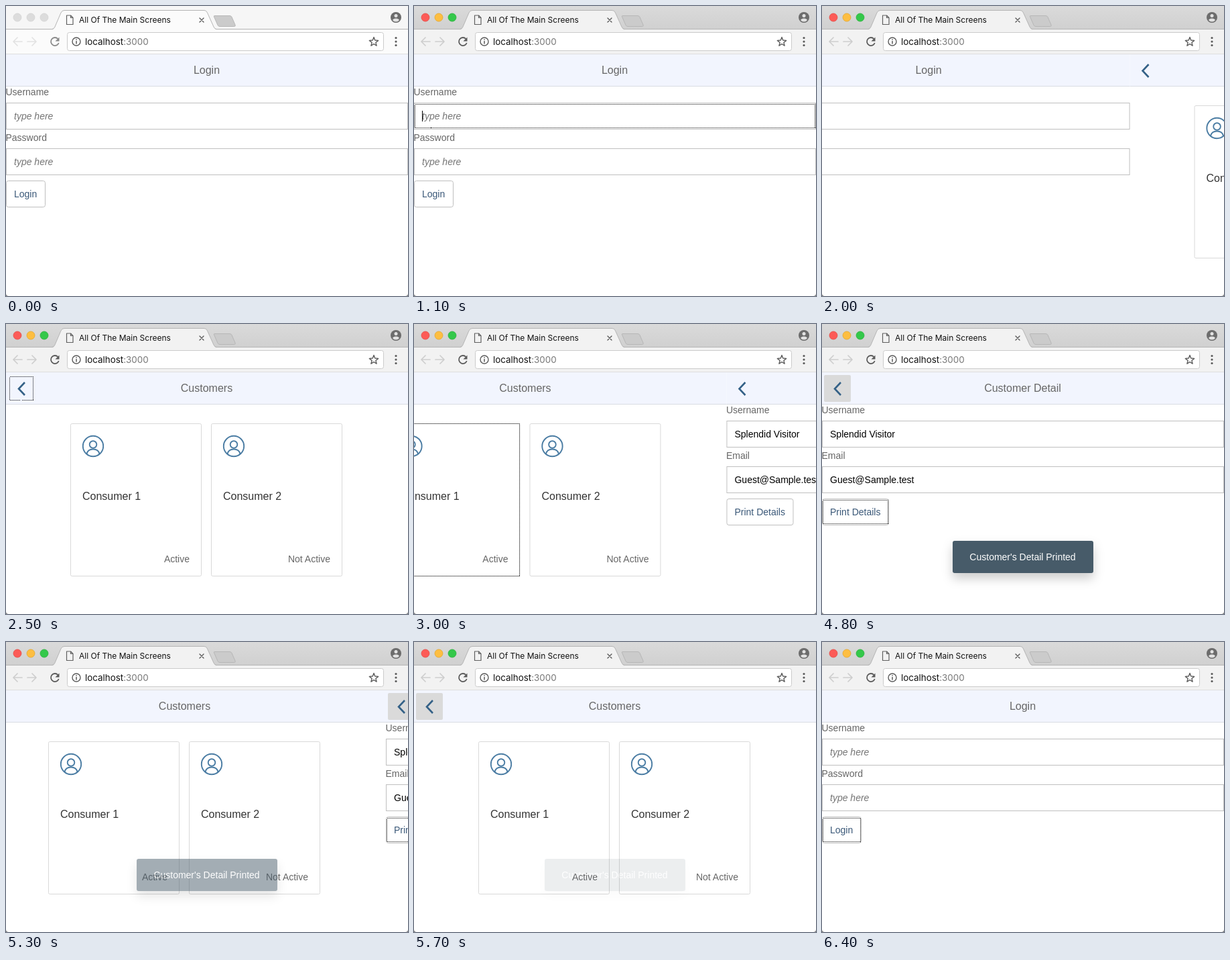
Recreate the animation shown at these times as an HTML page. Size 600 px wide and 432 px high, loop 6.9 s.

```html
<!DOCTYPE html>
<html lang="en">
<head>
<meta charset="utf-8">
<title>Login demo</title>
<style>
  html, body { margin: 0; width: 100%; height: 100%; overflow: hidden; background: #fff; }
  svg { display: block; width: 600px; height: 432px; font: 14px "Liberation Sans", Arial, sans-serif; }
  .browser { font-family: Inter, Roboto, sans-serif; }
  .line { fill: none; stroke-linecap: round; stroke-linejoin: round; }
  .title { font-size: 16px; fill: #666; text-anchor: middle; }
  .label { fill: #666; }
  .hint { fill: #757575; font-style: italic; }
  .name { font-size: 16px; fill: #333; }
  .status { fill: #666; text-anchor: end; }
  .button { fill: #3a5878; }
  .box { fill: #fff; stroke: #bfbfbf; }
  .card { fill: #fff; stroke: #d9d9d9; }
  .hover { fill: #dadada; }
  .focus { fill: none; stroke: #111; stroke-dasharray: 1 1; shape-rendering: crispEdges; }
  .chevron { fill: none; stroke: #346187; stroke-width: 2.6; }
  .strip { fill: url(#stripFill); }
  .tab, .toolbar { fill: #f2f2f2; }
  .inactive .strip { fill: #f6f6f6; }
  .inactive .tab, .inactive .toolbar { fill: #fbfbfb; }
  .inactive .light { fill: #dcdcdc; stroke: #d0d0d0; }
  .inactive .nav { stroke: #e2e2e2; }
  .inactive .reload { opacity: .7; }
  #toast rect { filter: drop-shadow(0 8px 8px rgba(0, 0, 0, .2)); }
</style>
</head>
<body>
<svg viewBox="0 0 600 432">
  <defs>
    <linearGradient id="stripFill" x2="0" y2="1">
      <stop stop-color="#dadada"/><stop offset="1" stop-color="#d0d0d0"/>
    </linearGradient>
  </defs>
  <rect width="600" height="432" fill="#fff"/>
  <g id="pages"></g>

  <g id="toast">
    <rect x="195" y="323" width="210" height="48" rx="3" fill="#475b69"/>
    <text x="299.5" y="352" fill="#fff" text-anchor="middle">Customer's Detail Printed</text>
  </g>

  <g id="browser" class="browser">
    <rect class="strip" width="600" height="35"/>
    <rect class="toolbar" y="35" width="600" height="37"/>
    <path d="M0 34.5H600" stroke="#b5b5b5"/>
    <path d="M0 71.5H600" stroke="#dedede"/>
    <path class="tab" d="M69 35Q72 34 73 31L82 10Q83.500 6.500 87 6.500H296Q299 6.500 300.500 10L310 31Q311 34 314 35"/>
    <path class="line" stroke="#b5b5b5" d="M69 34.500Q72 34 73 31L82 10Q83.500 6.500 87 6.500H296Q299 6.500 300.500 10L310 31Q311 34 314 34.500"/>
    <path d="M311 14.500H334Q336 14.500 337 16.500L342 28Q343 30.500 340.500 30.500H319Q317 30.500 316 28.500L310.500 16Q310 14.500 311 14.500Z" fill="#cbcbcb" stroke="#b7b7b7"/>
    <g stroke-width=".7">
      <circle class="light" cx="17" cy="17" r="6" fill="#fc5b57" stroke="#e2463f"/>
      <circle class="light" cx="37" cy="17" r="6" fill="#fdbe41" stroke="#e1a325"/>
      <circle class="light" cx="57" cy="17" r="6" fill="#34c84a" stroke="#24ac36"/>
    </g>
    <path class="line" stroke="#606060" stroke-width="1.2" d="M90.500 14H96.500L100 17.500V27.500H90.500ZM96.500 14V17.500H100"/>
    <text x="109" y="25" font-size="12" fill="#111">All Of The Main Screens</text>
    <path class="line" stroke="#555" stroke-width="1.3" d="M289 18L295 24M295 18L289 24"/>
    <circle cx="582" cy="17" r="8" fill="#6c6c6c"/>
    <g fill="#e2e2e2"><circle cx="582" cy="14.500" r="2.500"/><path d="M577 21Q578 18.500 582 18.500T587 21Q585 23.500 582 23.500T577 21Z"/></g>

    <g class="line" stroke="#cecece" stroke-width="1.7">
      <path class="nav" d="M24 53H11M17 47L11 53L17 59"/>
      <path class="nav" d="M32 53H45M39 47L45 53L39 59"/>
    </g>
    <g class="reload">
      <path d="M77.500 49A6 6 0 1 0 78.700 55" fill="none" stroke="#5a5a5a" stroke-width="1.8"/>
      <path d="M79.500 46.500V52.500H73.500Z" fill="#5a5a5a"/>
    </g>
    <rect x="91.500" y="39.500" width="472" height="27" rx="3" fill="#fff" stroke="#cbcbcb"/>
    <circle cx="105" cy="53" r="6" fill="none" stroke="#5a5a5a" stroke-width="1.4"/>
    <path d="M105 52V56.500M105 49.200V50.700" stroke="#5a5a5a" stroke-width="1.500"/>
    <text x="118" y="58" font-size="13.400" fill="#111">localhost<tspan fill="#777">:3000</tspan></text>
    <path id="star" class="line" stroke="#5a5a5a" stroke-width="1.400"/>
    <g fill="#5a5a5a"><circle cx="582" cy="47.500" r="1.600"/><circle cx="582" cy="53" r="1.600"/><circle cx="582" cy="58.500" r="1.600"/></g>
  </g>
  <path d="M0 428Q0 432 4 432H0ZM600 428Q600 432 596 432H600Z" fill="#777"/>
</svg>

<script>
const LOOP = 6900, WIDTH = 600, SLIDE = 600;
const $ = id => document.getElementById(id);

const text = (cls, x, y, content) => `<text class="${cls}" x="${x}" y="${y}">${content}</text>`;
const rect = (cls, x, y, w, h, radius = 0, id = '') =>
  `<rect ${id && `id="${id}"`} class="${cls}" x="${x + .5}" y="${y + .5}" width="${w - 1}" height="${h - 1}" rx="${radius}"/>`;

const header = title =>
  `<rect y="72" width="600" height="48" fill="#f2f5fe"/><path d="M0 119.5H600" stroke="#d9dce3"/>` +
  text('title', 299.5, 101, title);

const back = id =>
  `<rect id="${id}Hover" class="hover" x="3" y="76" width="40" height="40" rx="2"/>` +
  rect('focus', 5, 78, 36, 36, 0, id + 'Focus') +
  '<path class="chevron" d="M28 87L19 96.5L28 106"/>';

const field = (y, label, value, cls) =>
  text('label', -.5, y - 11, label) + rect('box', 0, y, 600, 40) + text(cls, 12, y + 25, value);

const button = (id, width, label) =>
  rect('box', 0, 260, width, 40, 3) +
  `<rect id="${id}Hover" class="hover" x="1" y="261" width="${width - 2}" height="38" rx="2"/>` +
  rect('focus', 1, 262, width - 2, 36, 0, id + 'Focus') + text('button', 12, 285, label);

const card = (x, name, status) =>
  rect('card', x, 148, 196, 228, 2) +
  `<g class="line" stroke="#4a7ca3" stroke-width="1.9" transform="translate(${x + 34} 182)">
    <circle r="15.2"/><circle cy="-2.5" r="5.3"/><path d="M-9.5 11.5Q-8 4.5 0 4.500T9.500 11.500"/></g>` +
  text('name', x + 18, 262, name) + text('status', x + 178, 355, status);

const pages = [
  header('Login') +
    field(144, 'Username', 'type here', 'hint') + field(212, 'Password', 'type here', 'hint') +
    rect('focus', 1, 146, 598, 36, 0, 'inputFocus') +
    '<path id="caret" d="M12.5 156V172" stroke="#000"/>' +
    button('login', 59, 'Login'),
  header('Customers') + back('list') +
    card(96, 'Consumer 1', 'Active') + card(306, 'Consumer 2', 'Not Active') +
    rect('focus', 96, 148, 196, 228, 0, 'cardFocus'),
  header('Customer Detail') + back('detail') +
    field(144, 'Username', 'Splendid Visitor', 'value') + field(212, 'Email', 'Guest@Sample.test', 'value') +
    button('print', 100, 'Print Details'),
];
$('pages').innerHTML = pages.map((page, i) => `<g transform="translate(${i * WIDTH})">${page}</g>`).join('');

$('star').setAttribute('d', 'M' + Array.from({ length: 10 }, (_, i) => {
  const r = i % 2 ? 3 : 7, a = (i / 5 - .5) * Math.PI;
  return `${549 + r * Math.cos(a)} ${53.5 + r * Math.sin(a)}`;
}).join('L') + 'Z');

// Each part is visible from the first time up to the second.
const visible = {
  inputFocus: [1100, 1800], caret: [1100, 1500],
  loginHover: [1500, 1800], listFocus: [2400, 2800], cardFocus: [2800, 3500],
  detailFocus: [3400, 3800], printHover: [3800, 4500], printFocus: [3800, 5400],
  detailHover: [4800, 5400], listHover: [5400, 6350],
};
const slides = [[1800, 1], [2805, 1], [4800, -1], [5750, -1]];

const clamp = v => Math.min(1, Math.max(0, v));

// cubic-bezier(.42, 0, .58, 1), solved by bisection
function easeInOut(x) {
  if (x <= 0 || x >= 1) return clamp(x);
  let low = 0, high = 1, s;
  for (let i = 0; i < 20; i++) {
    s = (low + high) / 2;
    const at = 1.26 * s * (1 - s) ** 2 + 1.74 * s * s * (1 - s) + s ** 3;
    if (at < x) low = s; else high = s;
  }
  return s * s * (3 - 2 * s);
}

const show = (id, on) => $(id).setAttribute('visibility', on ? 'visible' : 'hidden');

function draw(t) {
  $('browser').classList.toggle('inactive', t < 1100);
  for (const [id, [from, to]] of Object.entries(visible)) show(id, t >= from && t < to);
  show('loginFocus', t >= 1800 && t < 2500 || t >= 6350);
  const position = slides.reduce((sum, [start, step]) => sum + step * easeInOut((t - start) / SLIDE), 0);
  $('pages').setAttribute('transform', `translate(${-position * WIDTH})`);
  $('toast').setAttribute('opacity', clamp((t - 3780) / 300) * clamp((5800 - t) / 1000));
}

const begin = performance.now();
function tick() {
  draw((performance.now() - begin) % LOOP);
  requestAnimationFrame(tick);
}
tick();
</script>
</body>
</html>
```
